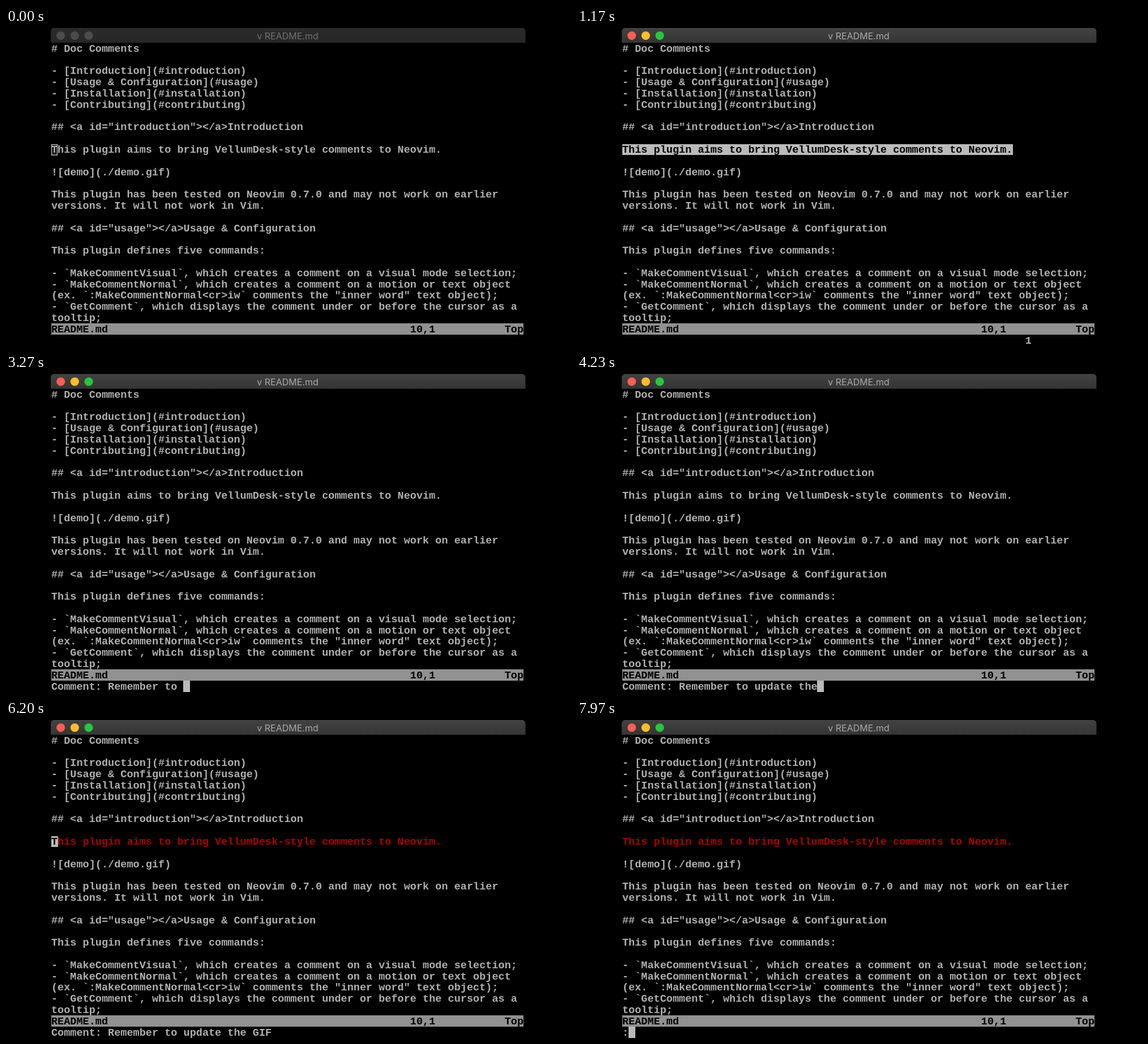
An HTML page with a canvas for the animation above (8000 ms loop, 998 px wide and 561 px high).

```html
<!DOCTYPE html>
<html lang="en">
<head>
<meta charset="utf-8">
<title>v README.md</title>
<style>
  html, body { margin: 0; width: 100%; height: 100%; overflow: hidden; background: #000; }
  canvas { display: block; }
</style>
</head>
<body>
<canvas id="stage" width="998" height="561"></canvas>
<script>
const ctx = document.getElementById('stage').getContext('2d');
const LOOP = 8000;
const LEFT = 80, TOP = 26.8, CELL_W = 11.12, CELL_H = 19.8;
const INK = '#b0b0b0', BLOCK = '#bababa', STATUS = '#919191', RED = '#aa0000';
const TARGET_ROW = 9, STATUS_ROW = 25, COMMAND_ROW = 26;

const LINES = `# Doc Comments

- [Introduction](#introduction)
- [Usage & Configuration](#usage)
- [Installation](#installation)
- [Contributing](#contributing)

## <a id="introduction"></a>Introduction

This plugin aims to bring VellumDesk-style comments to Neovim.

![demo](./demo.gif)

This plugin has been tested on Neovim 0.7.0 and may not work on earlier
versions. It will not work in Vim.

## <a id="usage"></a>Usage & Configuration

This plugin defines five commands:

- \`MakeCommentVisual\`, which creates a comment on a visual mode selection;
- \`MakeCommentNormal\`, which creates a comment on a motion or text object
(ex. \`:MakeCommentNormal<cr>iw\` comments the "inner word" text object);
- \`GetComment\`, which displays the comment under or before the cursor as a
tooltip;`.split('\n');

// Moments of the session, in ms
const FOCUS = 500, SELECT = 1000, PROMPT = 1730, SUBMIT = 5900, COLON = 7800;
const PROMPT_TEXT = 'Comment: ';
const COMMENT = 'Remember to update the GIF';
const TYPE_START = 2180, TYPE_STEP = 96;
const LAST_KEYS = [4330, 4620, 4860, 5010];
const STEADY = COMMENT.length - LAST_KEYS.length;
const keyTime = i => i < STEADY ? TYPE_START + i * TYPE_STEP : LAST_KEYS[i - STEADY];
const typedAt = t => [...COMMENT].filter((_, i) => t >= keyTime(i)).join('');

const cellX = col => LEFT + col * CELL_W;
const cellY = row => TOP + row * CELL_H;

// Blocks snap to whole pixels so their edges stay crisp
function fillCells(row, col, count, color) {
  const x = Math.floor(cellX(col)), y = Math.floor(cellY(row));
  ctx.fillStyle = color;
  ctx.fillRect(x, y, Math.ceil(cellX(col + count)) - x, Math.floor(cellY(row + 1)) - y);
}

function print(text, row, col = 0, color = INK) {
  ctx.font = 'bold 18.53px "Liberation Mono", monospace';
  ctx.textAlign = 'left';
  ctx.fillStyle = color;
  [...text].forEach((char, i) => ctx.fillText(char, cellX(col + i), cellY(row) + 15));
}

function drawTitleBar(active) {
  const shade = ctx.createLinearGradient(0, 0, 0, 26);
  shade.addColorStop(0, active ? '#424242' : '#2b2b2b');
  shade.addColorStop(1, active ? '#353535' : '#272727');
  ctx.fillStyle = shade;
  ctx.beginPath();
  ctx.roundRect(79, 0, 838.5, 26, [6, 6, 0, 0]);
  ctx.fill();

  ['#fa5e55', '#fcbb2d', '#28c63f'].forEach((color, i) => {
    ctx.fillStyle = active ? color : '#4b4b4b';
    ctx.beginPath();
    ctx.arc(96.7 + i * 24.7, 13.5, 7.6, 0, 2 * Math.PI);
    ctx.fill();
  });

  ctx.font = '16px Inter, sans-serif';
  ctx.textAlign = 'center';
  ctx.fillStyle = active ? '#a9a9a9' : '#717171';
  ctx.fillText('v README.md', 497.5, 19.5);
}

function drawTargetLine(t) {
  const text = LINES[TARGET_ROW];
  const selected = t >= SELECT && t < PROMPT;
  if (selected) fillCells(TARGET_ROW, 0, text.length, BLOCK);
  print(text, TARGET_ROW, 0, selected ? '#000' : t >= SUBMIT ? RED : INK);

  if (t < FOCUS) {
    ctx.strokeStyle = BLOCK;
    ctx.lineWidth = 1.5;
    ctx.strokeRect(cellX(0) + 0.75, cellY(TARGET_ROW) + 0.75, CELL_W - 1.5, CELL_H - 1.5);
  } else if (t < SELECT || (t >= SUBMIT && t < COLON)) {
    fillCells(TARGET_ROW, 0, 1, BLOCK);
    print(text[0], TARGET_ROW, 0, '#000');
  }
}

function drawCommandLine(t) {
  if (t < SELECT) return;
  if (t < PROMPT) return print('1', COMMAND_ROW, 64);
  const text = t < COLON ? PROMPT_TEXT + typedAt(t) : ':';
  print(text, COMMAND_ROW);
  if (t < SUBMIT || t >= COLON) fillCells(COMMAND_ROW, text.length, 1, BLOCK);
}

function draw(t) {
  ctx.fillStyle = '#000';
  ctx.fillRect(0, 0, 998, 561);
  drawTitleBar(t >= FOCUS);
  LINES.forEach((line, row) => row === TARGET_ROW ? drawTargetLine(t) : print(line, row));

  fillCells(STATUS_ROW, 0, 75, STATUS);
  print('README.md', STATUS_ROW, 0, '#000');
  print('10,1', STATUS_ROW, 57, '#000');
  print('Top', STATUS_ROW, 72, '#000');
  drawCommandLine(t);
}

const start = performance.now();
function tick() {
  draw((performance.now() - start) % LOOP);
  requestAnimationFrame(tick);
}
tick();
</script>
</body>
</html>
```
